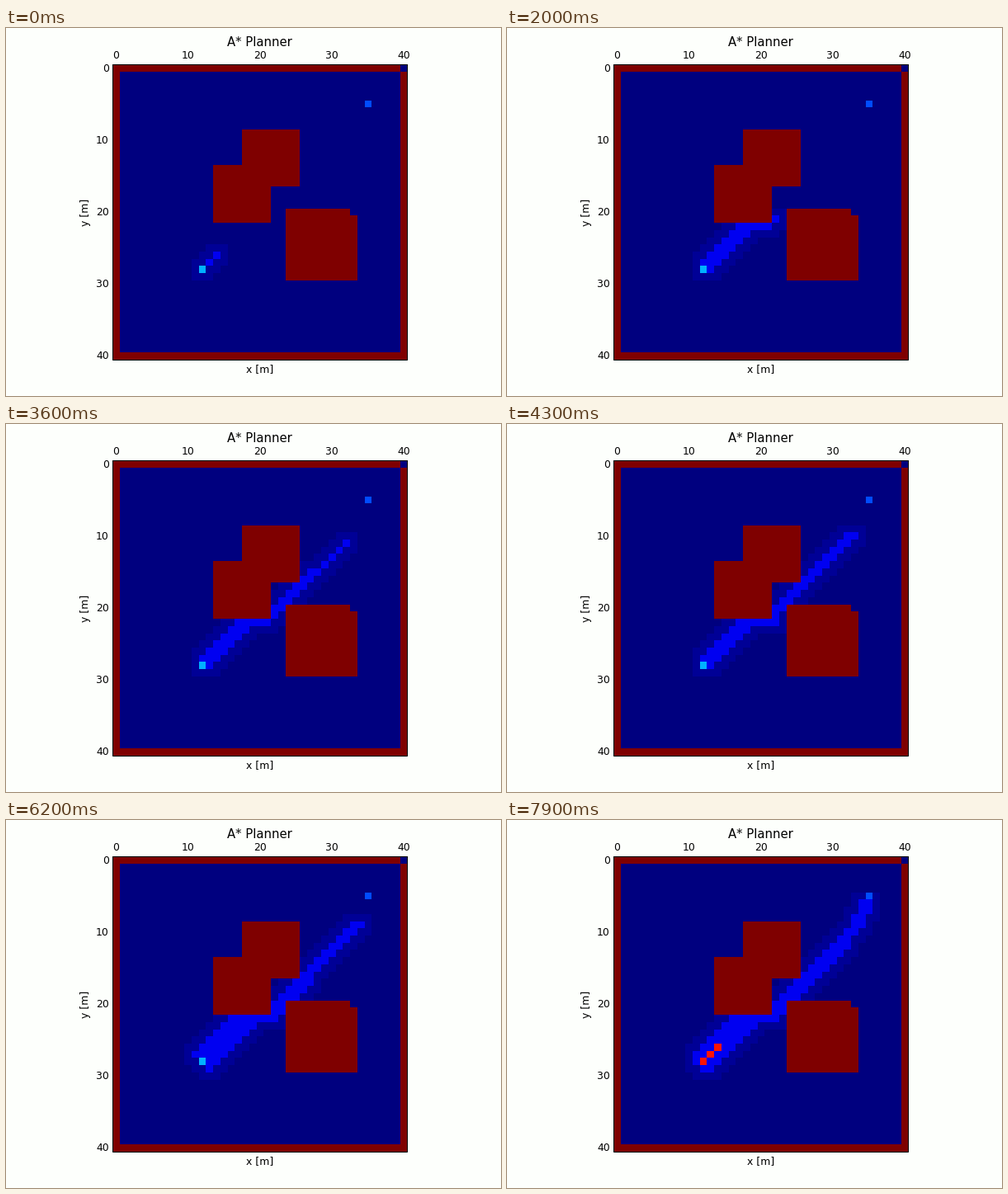
Recreate the animation shown at these times as a matplotlib script. Size 600 by 446 pixels, loop 8000 ms.

```python
import math

import numpy as np
import matplotlib.pyplot as plt
from matplotlib.animation import FuncAnimation

W, H, DPI = 600, 446, 64
N = 41
LEFT, TOP, SIZE = 128.9, 44.4, 357.3
CELL = SIZE / N
START, GOAL = (12, 28), (35, 5)
FRAMES, INTERVAL = 80, 100
FIRST_STEPS = 3      # nodes already expanded in the opening frame
PATH_FRAME = 77      # the found path starts to light up here

# levels on the jet colour map
OPEN, CLOSED, GOAL_LEVEL, START_LEVEL, PATH, WALL = 0.02, 0.1, 0.2, 0.3, 0.89, 1.0


def make_walls():
    walls = np.zeros((N, N), bool)
    walls[0, :-1] = walls[-1, :] = True
    walls[:, 0] = walls[1:, -1] = True
    walls[9:17, 18:26] = True
    walls[14:22, 14:22] = True
    walls[20:30, 24:34] = True
    walls[20, 33] = False
    return walls


def heuristic(node):
    return math.hypot(GOAL[0] - node[0], GOAL[1] - node[1])


def search(walls):
    """A* whose open nodes keep their first parent; returns the steps and the path."""
    cost, parent = {START: 0.0}, {START: None}
    queue, steps = [START], []

    def rank(node):
        h = heuristic(node)
        return round(cost[node] + h, 9), max(h, 2.0)

    while queue:
        node = min(queue, key=rank)
        queue.remove(node)
        if node == GOAL:
            break
        found = []
        for dx in (-1, 0, 1):
            for dy in (-1, 0, 1):
                nxt = (node[0] + dx, node[1] + dy)
                if nxt in cost or walls[nxt[1], nxt[0]]:
                    continue
                cost[nxt] = cost[node] + math.hypot(dx, dy)
                parent[nxt] = node
                queue.append(nxt)
                found.append(nxt)
        steps.append((node, found))

    path, node = [], GOAL
    while node:
        path.append(node)
        node = parent[node]
    return steps, path[::-1]


walls = make_walls()
steps, path = search(walls)


def grid_at(i):
    grid = np.where(walls, WALL, 0.0)
    done = steps[:i + FIRST_STEPS]
    for _, found in done:
        for x, y in found:
            grid[y, x] = OPEN
    for (x, y), _ in done:
        grid[y, x] = CLOSED
    grid[START[1], START[0]] = START_LEVEL
    grid[GOAL[1], GOAL[0]] = GOAL_LEVEL
    for x, y in path[:max(0, i - PATH_FRAME + 1)]:
        grid[y, x] = PATH
    return grid


plt.rcParams["font.family"] = "DejaVu Sans"
fig = plt.figure(figsize=(W / DPI, H / DPI), dpi=DPI, facecolor="#fdfffc")
ax = fig.add_axes([0, 0, 1, 1])
ax.axis("off")

image = ax.imshow(grid_at(0), cmap="jet", vmin=0, vmax=1, interpolation="nearest",
                  extent=(LEFT, LEFT + SIZE, TOP + SIZE, TOP), aspect="auto")
ax.set_xlim(0, W)
ax.set_ylim(H, 0)


def pt(px):
    return px * 72 / DPI


def label(x, y, text, px=12.4, **kw):
    kw = {"ha": "center", "va": "baseline", **kw}
    ax.text(x, y, text, fontsize=pt(px), color="black", **kw)


mid_x, mid_y = LEFT + SIZE / 2, TOP + SIZE / 2
ax.add_patch(plt.Rectangle((LEFT, TOP), SIZE, SIZE, fill=False, ec="black", lw=pt(1)))

for v in range(0, N, 10):
    offset = (v + 0.5) * CELL
    label(LEFT + offset, 37, str(v))
    label(124.6, TOP + offset + 3.9, str(v), ha="right")

label(mid_x - 0.4, 22, "A* Planner", 14.9)
label(mid_x, 417, "x [m]")
label(100.3, mid_y + 0.3, "y [m]", rotation=90, rotation_mode="anchor")


def update(i):
    image.set_data(grid_at(i))
    return (image,)


anim = FuncAnimation(fig, update, frames=FRAMES, interval=INTERVAL,
                     repeat=True, repeat_delay=0)
plt.show()
```
